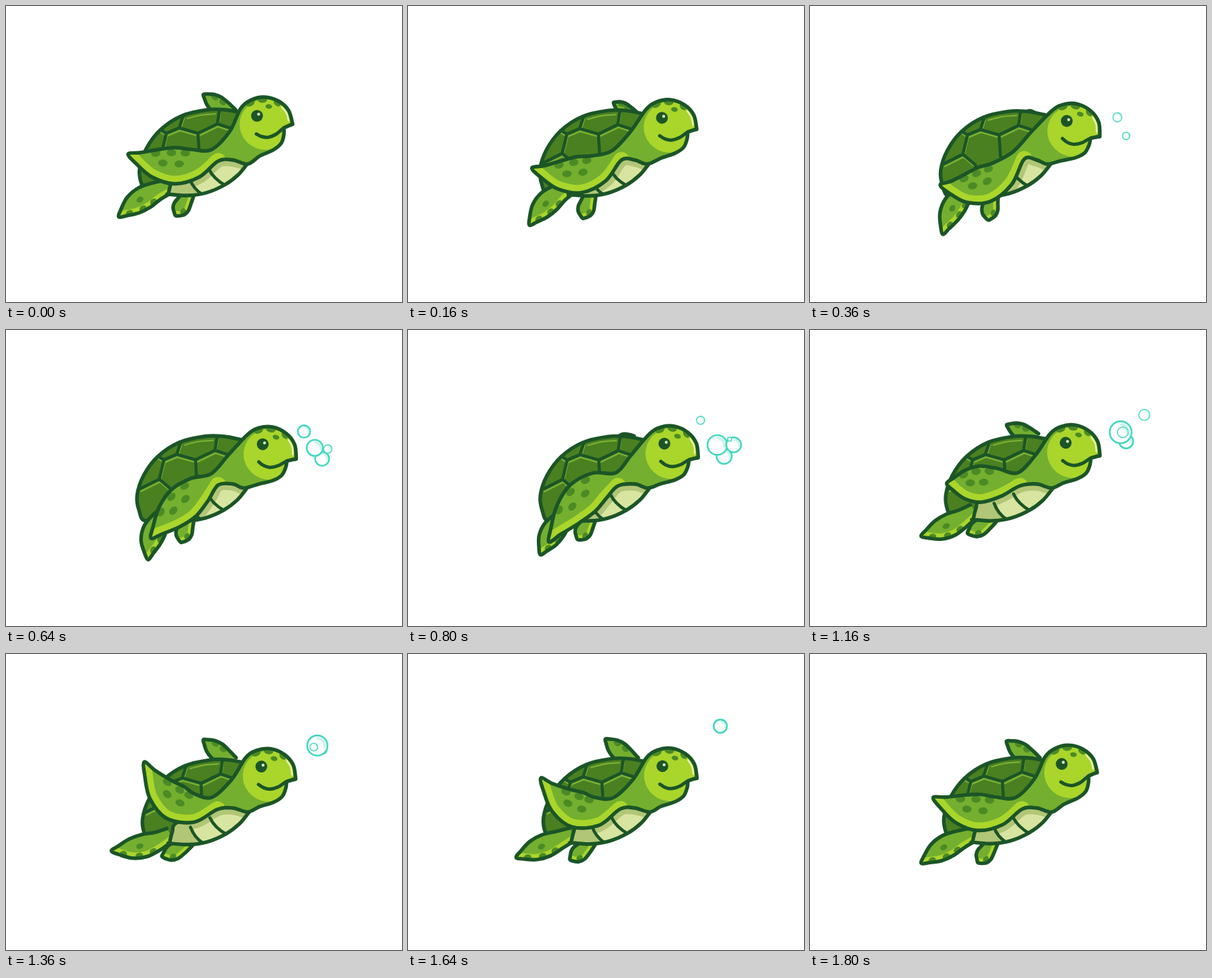
An HTML page with a canvas for the animation above (1.84 s loop, 590x442 px).

```html
<!DOCTYPE html>
<html lang="en">
<head>
<meta charset="utf-8">
<title>Swimming turtle</title>
<style>
  html, body { margin: 0; width: 100%; height: 100%; overflow: hidden; background: #fff; }
  canvas { display: block; width: 590px; height: 442px; }
</style>
</head>
<body>
<canvas id="stage" width="590" height="442"></canvas>
<script>
const ctx = document.getElementById('stage').getContext('2d');
const LOOP = 1840, STEP = 40;
const INK = '#1b5527', MID = '#74af2f', LIGHT = '#aad52b', SPOT = '#4b8a25',
      SHELL = '#4a8020', SHINE = '#7bb033', CREAM = '#d8e5a1', SHADE = '#b1c676', TEAL = '#45d8bf';

// Key poses: head angle, front tip x y, front bend, hind tip x y, far front tip x y.
const TIMES = [0, 360, 640, 960, 1360, 1640];
const POSES = [
  [0,   182,221, 255, 168,315, 294,132],
  [12,  194,267, 288, 198,341, 322,159],
  [10.5, 216,311, 250, 212,343, 326,163],
  [8,   202,301, 222, 179,325, 296,156],
  [6.7, 206,161, 252, 157,294, 294,128],
  [5.8, 198,185, 261, 161,304, 294,127]
];

const BUBBLES = [
  { born: 300, life: 1200, x: 471, drift: 0, y: 194, rise: 75, size: 11.5, ease: 3 },
  { born: 440, life: 1320, x: 459, drift: 7, y: 178, rise: 85, size: 16.4 },
  { born: 600, life: 640, x: 478, drift: 23, y: 178, rise: 67, size: 12 },
  { born: 780, life: 680, x: 480, drift: -25, y: 163, rise: 33, size: 8 },
  { born: 880, life: 220, x: 476, drift: 0, y: 175, rise: 10, size: 4.3 },
  { born: 280, life: 580, x: 462, drift: -29, y: 167, rise: 40, size: 9.5 }
];

const pairs = flat => {
  const out = [];
  for (let i = 0; i < flat.length; i += 2) out.push([flat[i], flat[i + 1]]);
  return out;
};
const mix = (a, b, k) => [a[0] + (b[0] - a[0]) * k, a[1] + (b[1] - a[1]) * k];

// Smooth cyclic interpolation between the key poses.
function pose(t) {
  const n = TIMES.length;
  const time = i => TIMES[(i + n) % n] + Math.floor(i / n) * LOOP;
  const row = i => POSES[(i + n) % n];
  let i = n - 1;
  while (TIMES[i] > t) i--;
  const span = time(i + 1) - time(i), u = (t - time(i)) / span;
  const slope = (j, c) => (row(j + 1)[c] - row(j - 1)[c]) / (time(j + 1) - time(j - 1)) * span;
  return row(i).map((a, c) => {
    const b = row(i + 1)[c], ma = slope(i, c), mb = slope(i + 1, c);
    return a + u * (ma + u * (3 * (b - a) - 2 * ma - mb + u * (2 * (a - b) + ma + mb)));
  });
}

// Open smooth curve through the points.
function curve(pts) {
  const p = new Path2D(), last = pts.length - 1;
  p.moveTo(...pts[0]);
  for (let i = 0; i < last; i++) {
    const a = pts[Math.max(i - 1, 0)], b = pts[i], c = pts[i + 1], d = pts[Math.min(i + 2, last)];
    p.bezierCurveTo(b[0] + (c[0] - a[0]) / 6, b[1] + (c[1] - a[1]) / 6,
                    c[0] - (d[0] - b[0]) / 6, c[1] - (d[1] - b[1]) / 6, c[0], c[1]);
  }
  return p;
}

// Flipper built on a bent spine; at(u, v) runs root to tip and lower to upper edge.
function limb(root, bend, tip, width, base, fullness) {
  const at = (u, v) => {
    const a = mix(root, bend, u), b = mix(bend, tip, u), [x, y] = mix(a, b, u);
    const dx = b[0] - a[0], dy = b[1] - a[1];
    const w = v * width * Math.sin(Math.PI * (base + (1 - base) * u ** fullness)) / Math.hypot(dx, dy);
    return [x - dy * w, y + dx * w];
  };
  const along = [0, .25, .5, .72, .9];
  const upper = along.map(u => at(u, 1));
  const lower = [tip, ...along.map(u => at(u, -1)).reverse()];
  return { at, lower, outline: [...upper, ...lower] };
}

function stroke(path, color, width) {
  ctx.strokeStyle = color;
  ctx.lineWidth = width;
  ctx.stroke(path);
}

function oval(x, y, rx, ry, color, turn = 0) {
  ctx.fillStyle = color;
  ctx.beginPath();
  ctx.ellipse(x, y, rx, ry, turn, 0, Math.PI * 2);
  ctx.fill();
}

// Filled shape with details kept inside it and the outline on top.
function part(path, color, details) {
  ctx.fillStyle = color;
  ctx.fill(path);
  ctx.save();
  ctx.clip(path);
  details();
  ctx.restore();
  stroke(path, INK, 5.4);
}

function markings(flipper, band, spots, size) {
  if (band) stroke(curve(flipper.lower), LIGHT, band);
  for (const [u, v] of spots) {
    const [x, y] = flipper.at(u, v), [px, py] = flipper.at(u - .1, v);
    oval(x, y, size, size * .74, SPOT, Math.atan2(py - y, px - x));
  }
}

const drawLimb = (flipper, ...look) =>
  part(curve(flipper.outline), MID, () => markings(flipper, ...look));

const shellPath = curve(pairs([354,160, 327,155, 300,155, 262,164, 230,185, 209,213, 199,243,
  202,266, 212,281, 250,268, 330,225]));
const shellShine = curve(pairs([270,168, 290,163, 312,161]));
const seams = new Path2D('M318 156L315 176L336 183M315 176L286 190L258 182L264 164' +
  'M286 190L288 222M258 182L239 190L232 219L251 235L249 254M239 190L229 184M232 219L204 233');
const bellyPath = curve(pairs([360,235, 346,252, 326,267, 298,279, 270,283, 242,281, 242,280,
  246,264, 253,250, 300,230, 340,222]));
const bellySeams = new Path2D('M273 257Q279 273 292 281M302 243Q309 258 327 268');
const headTop = pairs([427,176, 421,156, 406,142, 384,136, 364,141, 349,154]);
const chin = pairs([378,224, 398,215, 410,205, 414,192, 414,182]);
const smile = curve(pairs([373,191, 381,195, 391,196, 403,191, 414,182, 427,177]));
const gleam = curve(pairs([411,151, 418,160, 421,171]));

function shell(x, y) {
  ctx.save();
  ctx.translate(x, y);
  part(shellPath, SHELL, () => {
    stroke(shellShine, SHINE, 2.2);
    ctx.save();
    ctx.translate(1, 4);
    stroke(seams, SHINE, 2.6);
    ctx.restore();
    stroke(seams, INK, 4.6);
  });
  ctx.restore();
}

function belly(x, y, edge) {
  ctx.save();
  ctx.translate(x, y);
  part(bellyPath, CREAM, () => {
    ctx.fillStyle = SHADE;
    ctx.fill(new Path2D('M236 240H273Q279 273 292 290H236Z'));
    ctx.save();
    ctx.translate(-x, -y);
    stroke(edge, SHADE, 20);
    ctx.restore();
    stroke(bellySeams, INK, 4.6);
  });
  ctx.restore();
}

function face() {
  oval(387, 177, 39, 38, LIGHT);
  oval(364, 145, 7, 4.5, SPOT, -.5);
  oval(382, 140, 7, 4.5, SPOT);
  oval(391.5, 150, 5, 3.5, SPOT, .1);
  oval(404, 145, 6, 4, SPOT, .7);
  stroke(gleam, '#e6f2b4', 2.6);
}

function drawTurtle(t) {
  const [nod, frontX, frontY, frontBend, hindX, hindY, farX, farY] = pose(t);
  const phase = t / LOOP * Math.PI * 2;
  const sway = Math.sin(phase), lag = Math.sin(phase + .2), sink = Math.sin(phase / 2);
  const shellX = -4.5 * sway, shellY = 4.2 * sink;

  const matrix = new DOMMatrix().translate(341 + 3.2 * Math.sqrt(sink), 197)
    .rotate(nod).translate(-341, -197);
  const turn = ([x, y]) => {
    const q = matrix.transformPoint({ x, y });
    return [q.x, q.y];
  };
  const inHead = draw => {
    ctx.save();
    ctx.transform(matrix.a, matrix.b, matrix.c, matrix.d, matrix.e, matrix.f);
    draw();
    ctx.restore();
  };

  const farHindTip = [249 + 17 * lag, 311 + 9 * lag], farHindRoot = [272, 280];
  const [midX, midY] = mix(farHindRoot, farHindTip, .5);
  const farHind = limb(farHindRoot, [midX - 2, midY + 7], farHindTip, 12, .25, 1.6);
  const farRoot = [336, 163], farTip = [farX, farY];
  const [bendX, bendY] = mix(farRoot, farTip, .5);
  const reach = Math.hypot(farX - farRoot[0], farY - farRoot[1]);
  const farFront = limb(farRoot, [bendX - 2, bendY - 2], farTip, reach * .24, .3, 1.5);
  const hind = limb([245, 269], [206 + 9 * sink, 280 + 14 * sink], [hindX, hindY], 17, .2, 1.6);
  const front = limb([311, 223], [257 + 10 * sway, frontBend], [frontX, frontY], 27, .12, 1.2);
  const chest = [[338, 230], [360 - 7 * Math.max(0, sway), 236]];

  drawLimb(farHind, 14, [[.62, -.5]], 5);
  drawLimb(farFront, 0, [[.4, .6], [.66, .6]], 5.5);
  shell(shellX, shellY);
  drawLimb(hind, 17, [[.4, -.75], [.62, -.75], [.84, -.6], [.58, .05]], 5.5);
  belly(shellX * .4, shellY * .5, curve([...front.lower, ...chest]));

  const neck = [333.5 + shellX * .7, 187];
  const body = curve([...headTop.map(turn), neck, ...front.outline, ...chest, ...chin.map(turn)]);
  body.closePath();
  part(body, MID, () => {
    markings(front, 24, [[.36, .72], [.55, .72], [.74, .72], [.45, .1], [.64, .1]], 7);
    inHead(face);
  });
  inHead(() => {
    stroke(smile, INK, 5);
    oval(374, 164, 8.8, 8.8, INK);
    oval(376.4, 161.6, 2.2, 2.2, '#e3f2c4');
  });
}

function drawBubble({ born, life, x, drift, y, rise, size, ease = 2 }, t) {
  const u = (t - born) / life;
  if (u <= 0 || u >= 1) return;
  const r = size * Math.sin(Math.PI * u) ** .4;
  const cx = x + drift * u, cy = y - rise * u ** ease;
  oval(cx, cy, r, r, '#fff');
  const glint = new Path2D(), ring = new Path2D();
  glint.arc(cx, cy, r * .72, -1.5, .2);
  ring.arc(cx, cy, r, 0, Math.PI * 2);
  stroke(glint, '#c9f5eb', r * .25);
  stroke(ring, TEAL, r > 9 ? 2.6 : 1.5);
}

function draw(t) {
  ctx.fillStyle = '#fff';
  ctx.fillRect(0, 0, 590, 442);
  ctx.lineCap = ctx.lineJoin = 'round';
  drawTurtle(t);
  BUBBLES.forEach(bubble => drawBubble(bubble, t));
}

const start = performance.now();
function tick() {
  const t = (performance.now() - start) % LOOP;
  draw(Math.floor(t / STEP) * STEP);
  requestAnimationFrame(tick);
}
tick();
</script>
</body>
</html>
```
